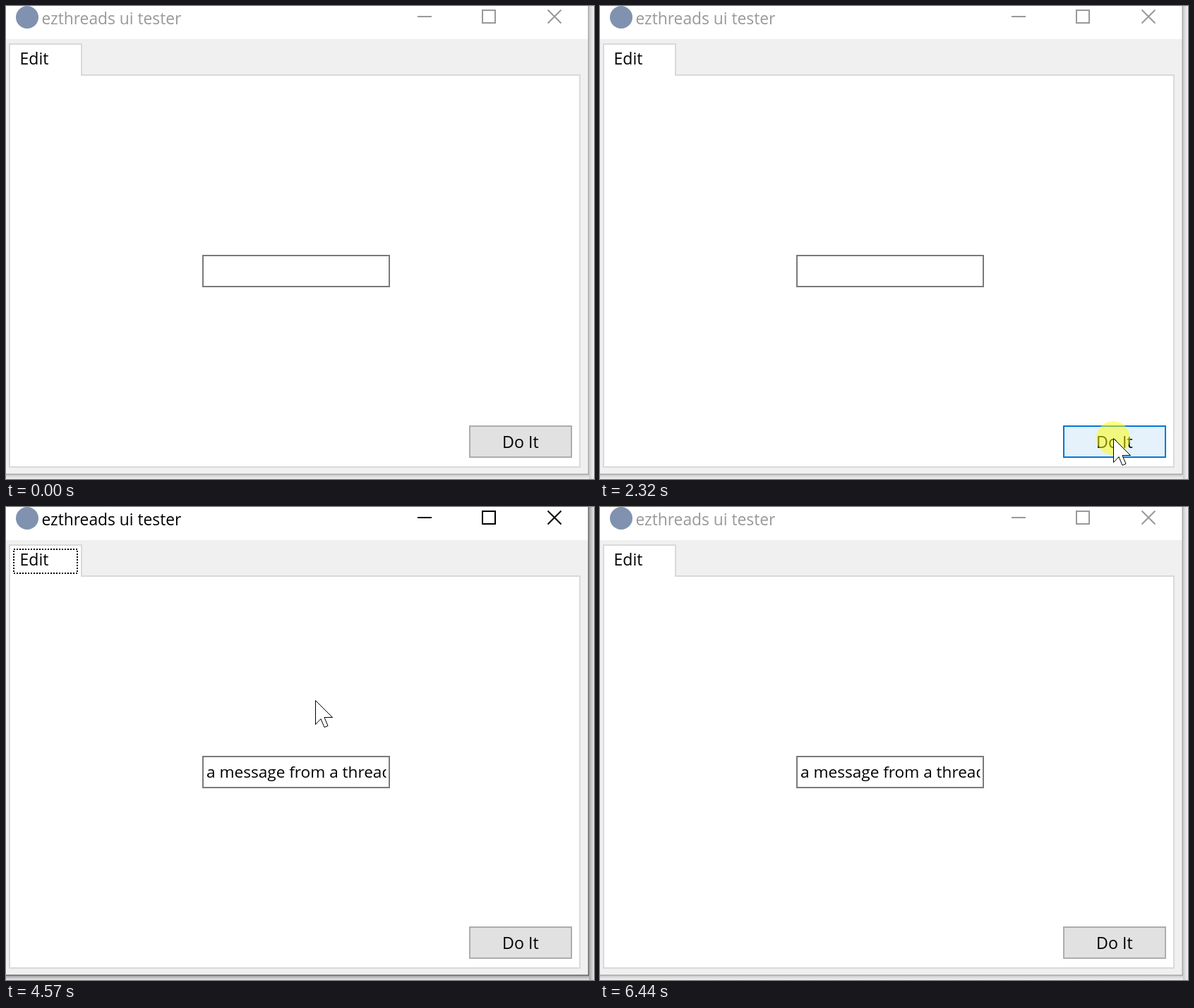
Write an HTML page that moves like this. It is 833 by 671 pixels and loops after 6.68 s.

```html
<!DOCTYPE html>
<html lang="en">
<head>
<meta charset="utf-8">
<title>ezthreads ui tester</title>
<style>
  html, body { margin: 0; width: 100%; height: 100%; overflow: hidden; background: #fff; }
  svg { display: block; width: 833px; height: 671px; }
  text { font: 22.6px "Open Sans", "Noto Sans", sans-serif; fill: #000; }
  .chrome { --ink: #999; --edge: #a9a9a9; --shade: .2; }
  .active .chrome { --ink: #000; --edge: #686868; --shade: .36; }
  .chrome text { fill: var(--ink); }
  .glyphs { fill: none; stroke: var(--ink); stroke-width: 2; }
  .edge { fill: none; stroke: var(--edge); stroke-width: 1.5; }
  .shadow { opacity: var(--shade); }
  .focus { display: none; }
  .active .focus { display: inline; }
  .pane { fill: #fff; stroke: #d9d9d9; stroke-width: 2; }
  #field, #button { stroke-width: 2; }
  #button { fill: #e1e1e1; stroke: #adadad; }
  #button.hover { fill: #e5f1fb; stroke: #0078d7; }
  #button.pressed { fill: #cce4f7; stroke: #005499; }
  #button.disabled { fill: #ccc; stroke: #bfbfbf; }
  #button.disabled + text { fill: #838383; }
</style>
</head>
<body>
<svg id="stage" viewBox="0 0 833 671">
  <defs>
    <linearGradient id="fadeX"><stop/><stop offset="1" stop-opacity=".25"/></linearGradient>
    <linearGradient id="fadeY" x2="0" y2="1"><stop/><stop offset="1" stop-opacity=".25"/></linearGradient>
    <clipPath id="fieldClip"><rect x="282" y="357" width="256.5" height="38"/></clipPath>
  </defs>
  <g class="chrome">
    <path class="shadow" d="M826 0h7v671h-7z" fill="url(#fadeX)"/>
    <path class="shadow" d="M0 665h826v6H0z" fill="url(#fadeY)"/>
    <path d="M0 0h825v664H0z" fill="#fff"/>
    <path d="M0 47h825v617H0z" fill="#f0f0f0"/>
    <path class="edge" d="M825.25 0V664.25H0"/>
    <circle cx="30" cy="16" r="16" fill="#8092af"/>
    <text x="50.5" y="26" style="font-size:22.8px">ezthreads ui tester</text>
    <g class="glyphs">
      <path d="M583 15h20M675 6h18v18h-18z"/>
      <path d="M767.5 5.5l19 19m0-19l-19 19"/>
    </g>
  </g>
  <path class="pane" d="M5 654V54H107V98H813V654z"/>
  <text x="19.5" y="83" style="font-size:23px">Edit</text>
  <path class="focus" d="M11 60H101V94H11z" fill="none" stroke="#000" stroke-width="2" stroke-dasharray="2"/>
  <rect id="field" x="279" y="354" width="264" height="44" fill="#fff"/>
  <g clip-path="url(#fieldClip)"><text id="message" x="284" y="383.5">a message from a thread</text></g>
  <rect id="button" x="657" y="596" width="144" height="44"/>
  <text x="703" y="627" style="font-size:23.2px">Do It</text>
  <circle id="click" cx="727" cy="613" r="24" fill="#ff0" opacity=".5"/>
  <path id="arrow" d="M.5.5V34.5L8 26.5 13 38.5 18 36.5 13 24.5H24.5z" fill="#fff" stroke="#000"/>
  <path id="beam" d="M-6-15h4l2 2 2-2h4M0-13V13M-6 15h4l2-2 2 2h4" fill="none" stroke="#000" stroke-width="2"/>
</svg>
<script>
const LOOP = 6680, TICK = 124, LEAD = 44;
const CLICK = 2320, PRESS = 2460, RELEASE = 2580, REPLY = 3590, BLUR = 6440;
const $ = id => document.getElementById(id);

// Turning points of the pointer: [tick, x, y]
const path = [
  [5, 489, 646], [9, 545, 496], [10, 604, 483], [11, 694, 536], [16, 727, 613],
  [26, 727, 613], [27, 670, 572], [32, 449, 506], [33, 449, 506],
  [37, 438, 274], [41, 433, 427], [45, 430, 680]
];

const between = (v, from, to) => v >= from && v < to;
const show = (id, on) => $(id).setAttribute('visibility', on ? 'visible' : 'hidden');

// The pointer is sampled once per tick and slows towards each turning point.
function pointerAt(t) {
  const tick = Math.floor((t + LEAD) / TICK);
  const i = path.findIndex(([end]) => tick < end);
  if (i < 1) return null;
  const [t0, x0, y0] = path[i - 1], [t1, x1, y1] = path[i];
  const u = 1 - (1 - (tick - t0) / (t1 - t0)) ** 2;
  return { x: x0 + (x1 - x0) * u, y: y0 + (y1 - y0) * u };
}

const inside = (p, box) => p !== null &&
  between(p.x, box.x, box.x + box.width) && between(p.y, box.y, box.y + box.height);

function buttonState(t, pointer) {
  if (between(t, PRESS, RELEASE)) return 'pressed';
  if (between(t, RELEASE, REPLY)) return 'disabled';
  return inside(pointer, $('button').getBBox()) ? 'hover' : '';
}

// The field border darkens as the pointer comes near.
function fieldGrey(pointer) {
  if (!pointer) return 122;
  const gap = Math.max(355 - pointer.y, pointer.y - 397, 0);
  return Math.min(122, 40 + gap * 1.1);
}

function draw(t) {
  const pointer = pointerAt(t);
  const overField = inside(pointer, $('field').getBBox());
  show('arrow', pointer && !overField);
  show('beam', overField);
  if (pointer) {
    const place = `translate(${Math.round(pointer.x)} ${Math.round(pointer.y)})`;
    for (const id of ['arrow', 'beam']) $(id).setAttribute('transform', place);
  }

  const grey = fieldGrey(pointer);
  $('field').style.stroke = `rgb(${grey} ${grey} ${grey})`;
  $('button').setAttribute('class', buttonState(t, pointer));
  $('stage').classList.toggle('active', between(t, PRESS, BLUR));
  show('click', between(t, CLICK, RELEASE));
  show('message', t >= REPLY);
}

const start = performance.now();
function tick() {
  draw((performance.now() - start) % LOOP);
  requestAnimationFrame(tick);
}
tick();
</script>
</body>
</html>
```
